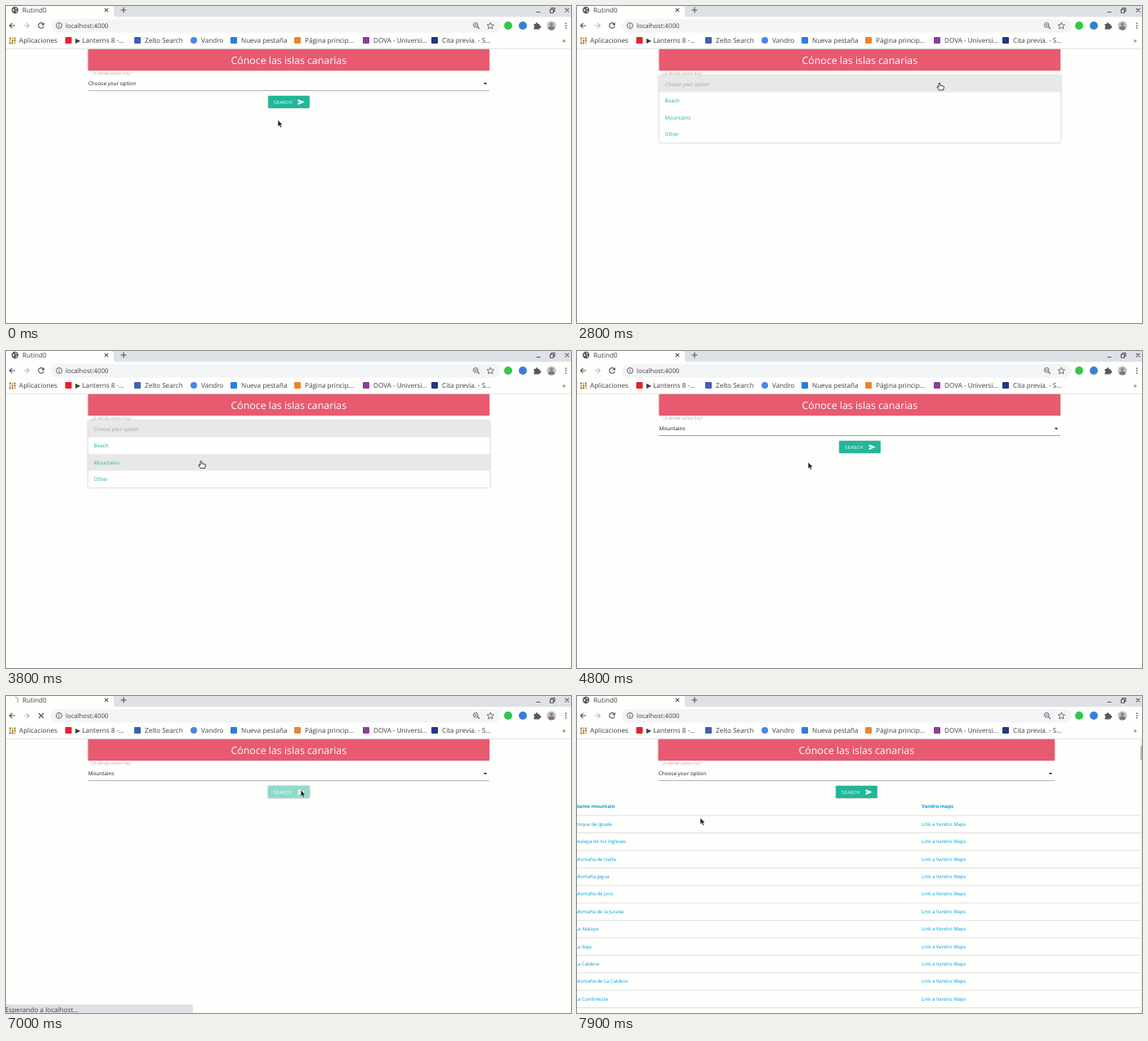
Animation of 692x388 px, one loop 8 s. Source, as an HTML page:

```html
<!DOCTYPE html>
<html lang="es">
<head>
<meta charset="utf-8">
<title>Rutind0</title>
<style>
  html, body { margin: 0; width: 100%; height: 100%; overflow: hidden; background: #fefefc; }
  svg { display: block; width: 692px; height: 388px; }
  text { font: 8.15px "Open Sans", "Noto Sans", sans-serif; fill: #3c4043; text-rendering: geometricPrecision; }
  .line { fill: none; stroke: #505357; stroke-width: 1.1; }
  .small { font-size: 6.35px; fill: #1c1c1c; }
  .label { font-size: 4.8px; fill: #a8a8a8; }
  .title { font-size: 12.35px; fill: #fff; text-anchor: middle; }
  .caps { font-size: 5.7px; letter-spacing: .25px; fill: #fff; }
  .option { font-size: 6.35px; fill: #22b296; }
  .off { fill: #a3a3a3; font-style: italic; }
  .link { font-size: 5.95px; fill: #0a9fdc; }
  .head { font-weight: 700; }
  .raised { filter: drop-shadow(0 .8px .8px rgba(0, 0, 0, .3)); }
</style>
</head>
<body>
<svg id="stage" viewBox="0 0 692 388">
  <rect width="692" height="388" fill="#fefefc"/>
  <g id="form"></g>
  <g id="results"></g>
  <g id="menu" class="raised"></g>

  <g id="browser">
    <rect width="692" height="13.5" fill="#dee1e6"/>
    <path d="M0 0H129Q132 0 132 3V10.500Q132 13.500 135 13.500H692V52H0Z" fill="#fefefc"/>
    <path d="M0 52.300H692" stroke="#dcdddf" stroke-width=".8"/>
    <rect x="55" y="16" width="551" height="16.500" rx="8.250" fill="#f3f4f5"/>
    <text x="20" y="8">Rutind0</text>
    <g id="globe">
      <circle cx="11" cy="5" r="4.200" fill="#55585c"/>
      <path d="M8 3.500l2.500 1 -.5 2 -1.500 -.5zM11 1.800l2.500 1.200 -1.500 1.500zM12 5.500l2 .5 -1.500 2z" fill="#e9eaec"/>
    </g>
    <path id="spinner" class="line" d="M11 1.200A3.900 3.900 0 0 1 13.700 7.900" style="stroke:#999da2"/>
    <path class="line" d="M120.800 2.800l4.400 4.400m0 -4.400l-4.400 4.400M140.500 5h7M144 1.500v7M649.500 7.500h5M684.800 2.800l4.600 4.600m0 -4.600l-4.600 4.600M666.500 4.200h4v4h-4zM668 4v-1.500h4v4h-1.500"/>
    <path class="line" d="M11.200 24H4.500m3 -3.200L4.300 24l3.200 3.200"/>
    <path class="line" d="M21.500 24h6.700m-3 -3.200l3.200 3.200 -3.200 3.200" style="stroke:#b7babd"/>
    <g id="reload">
      <path class="line" d="M45.500 21.700A3.300 3.300 0 1 0 46.200 24.800"/>
      <path d="M46.800 20v3.600h-3.600z" fill="#505357"/>
    </g>
    <path id="stop" class="line" d="M40 21l6 6m0 -6l-6 6"/>
    <circle class="line" cx="65" cy="24" r="3.500" style="stroke-width:.9"/>
    <path class="line" d="M65 23.500v2.500M65 21.800v.9" style="stroke-width:.9"/>
    <text x="73" y="26.800" style="font-size:7.75px">localhost:4000</text>
    <path class="line" d="M577.500 25.500l2.300 2.300M573.800 23.300h2.800"/>
    <circle class="line" cx="575.200" cy="23.300" r="2.800" style="stroke-width:.9"/>
    <path class="line" d="M593.300 20l1.200 2.800 3 .2 -2.300 2 .8 3 -2.700 -1.700 -2.700 1.700 .8 -3 -2.300 -2 3 -.2z" style="stroke-width:.8"/>
    <circle cx="615" cy="24" r="5" fill="#35c649"/>
    <circle cx="633" cy="24" r="5" fill="#3c7fd0"/>
    <path d="M646.500 22h2.300a1.300 1.300 0 1 1 2.400 0h2.300v2.300a1.300 1.300 0 1 1 0 2.400v1.800h-7v-1.900a1.300 1.300 0 0 0 0 -2.400z" fill="#55585c"/>
    <circle cx="668" cy="24" r="5.600" fill="#c9c0c2"/>
    <path d="M664 27.900a4 3.500 0 0 1 8 0a5.600 5.600 0 0 1 -8 0z" fill="#7c7780"/>
    <circle cx="668" cy="22.300" r="2.100" fill="#8f8584"/>
    <path d="M685.700 20.500v1.400m0 1.400v1.400m0 1.400v1.400" stroke="#505357" stroke-width="1.400"/>
    <text x="681.500" y="45">»</text>
  </g>

  <g id="status">
    <path d="M0 377.500H226.500Q229 377.500 229 380V388H0Z" fill="#dee1e6"/>
    <text x="-1" y="386.500">Esperando a localhost…</text>
  </g>
  <path id="arrow" d="M0 0V8.300L1.900 6.600 3.200 9.500 4.700 8.800 3.500 6H6Z" fill="#222" stroke="#fff" stroke-width=".6"/>
  <path id="hand" d="M-1 .8Q0 -.4 .9 .8V3.400L4.900 4.100Q5.700 4.400 5.500 5.500L4.600 8.900H-.6L-3 5.600Q-3.200 4.500 -2.100 4.700L-1 5.500Z" fill="#fff" stroke="#222" stroke-width=".9"/>
</svg>

<script>
const $ = id => document.getElementById(id);
const text = (x, y, str, cls = "") => `<text x="${x}" y="${y}" class="${cls}">${str}</text>`;
const rect = (x, y, w, h, fill, more = "") =>
  `<rect x="${x}" y="${y}" width="${w}" height="${h}" fill="${fill}" ${more}/>`;

// Bookmarks bar: icon x, colour, corner radius, label x, label
const bookmarks = [
  [72.5, "#e8212b", 1, 85, "▶ Lanterns 8 -…"],
  [157, "#3c62b4", 1, 170, "Zelto Search"],
  [226, "#4a86e8", 4, 239, "Vandro"],
  [275, "#2a7de1", 1, 288, "Nueva pestaña"],
  [353, "#e8862f", 1, 366, "Página princip…"],
  [437, "#8a3f98", 1, 450, "DOVA - Universi…"],
  [521, "#22387e", 1, 534, "Cita previa. - S…"]
];
let bar = text(16, 45, "Aplicaciones");
const dots = ["#e24a3b", "#f0b429", "#3f9d58"];
for (let i = 0; i < 9; i++)
  bar += rect(4 + i % 3 * 2.9, 38.6 + (i / 3 | 0) * 2.9, 2, 2, dots[(i + (i / 3 | 0)) % 3]);
for (const [ix, fill, r, x, label] of bookmarks)
  bar += rect(ix, 38, 8, 8, fill, `rx="${r}"`) + text(x, 45, label);
$("browser").insertAdjacentHTML("beforeend", bar);

// The search form; the scrollbar of the results page makes it narrower
function form(left, width, id) {
  const mid = left + width / 2, right = left + width, b = mid - 25.2;
  return rect(left, 52.6, width, 26.4, "#e75a70", 'class="raised"') +
    text(mid, 70.6, "Cónoce las islas canarias", "title") +
    text(left + 5, 84.2, "¿A dónde vamos hoy?", "label") +
    `<text id="value${id}" x="${left + .2}" y="97.200" class="small">Choose your option</text>
    <path d="M${right - 7.2} 93.900h4.400l-2.200 2.400z" fill="#222"/>
    <path id="rule${id}" d="M${left} 103.600H${right}" stroke="#9e9e9e" stroke-width=".8"/>
    <clipPath id="clip${id}">${rect(b, 110, 50.6, 15, "#000", 'rx="1"')}</clipPath>` +
    rect(b, 110, 50.6, 15, "#21b799", 'rx="1" class="raised"') +
    text(b + 7, 119.8, "SEARCH", "caps") +
    `<path d="M${b + 36.5} 114.200l8 3.400 -8 3.400v-2.700l5 -.7 -5 -.7z" fill="#fff"/>
    <g clip-path="url(#clip${id})"><circle id="ripple${id}" cx="361" cy="116" r="0" fill="#fff" opacity=".5"/></g>`;
}
$("form").innerHTML = form(100.6, 491.4, "A");

const peaks = ["Roque de Iguala", "Atalaya de los Ingleses", "Montaña de Izaña", "Montaña Jagua",
  "Montaña de Joco", "Montaña de la Jurada", "La Atalaya", "La Baja", "La Caldera",
  "Montaña de La Caldera", "La Cumbrecita"];
let table = form(99.6, 485.4, "B") +
  text(-2, 137.4, "Name mountain", "link head") + text(422, 137.4, "Vandro maps", "link head");
peaks.forEach((name, i) => {
  const y = 146.2 + i * 21.4;
  table += `<path d="M0 ${y}H690" stroke="#d3d3d3" stroke-width=".7"/>` +
    text(-2, y + 12.6, name, "link") + text(422, y + 12.6, "Link a Vandro Maps", "link");
});
table += '<path d="M0 381.600H690" stroke="#d3d3d3" stroke-width=".7"/>' +
  rect(690, 52.6, 2, 336, "#f1f1f1") + rect(690.3, 61, 1.7, 17, "#aeaeae");
$("results").innerHTML = table;

const options = ["Choose your option", "Beach", "Mountains", "Other"];
$("menu").innerHTML = rect(100.6, 85, 492, 82, "#fefefe") + options.map((name, i) =>
  rect(100.6, 85 + i * 20.5, 492, 20.5, "#e8e8e7", `id="row${i}"`) +
  text(107.6, 97.5 + i * 20.5, name, i ? "option" : "option off")).join("");

const LOOP = 8000, FRAME = 100;
const OPEN = 2384, PICK = 4200, CLICK = 5500, WAIT = 5700, LOADED = 7400;
// Pointer: time, x, y
const path = [
  [0, 333, 139.5], [200, 361, 177], [500, 311, 211], [800, 344, 145], [900, 345, 126],
  [1500, 421, 97], [2000, 444, 94], [3200, 444, 94], [3700, 239, 134.5], [4200, 239, 134.5],
  [4800, 283, 136], [5000, 283, 136], [5500, 361, 115], [7700, 361, 115], [7900, 151, 149]
];
const clamp = v => Math.min(1, Math.max(0, v));
const outQuint = v => 1 - (1 - clamp(v)) ** 5;
const show = (id, on) => $(id).setAttribute("visibility", on ? "visible" : "hidden");

function pointer(t) {
  const i = path.findIndex(p => p[0] > t);
  if (i < 0) return path[path.length - 1].slice(1);
  const [t0, x0, y0] = path[i - 1], [t1, x1, y1] = path[i];
  const u = (t - t0) / (t1 - t0), e = u * u * (3 - 2 * u);
  return [x0 + (x1 - x0) * e, y0 + (y1 - y0) * e];
}

function draw(t) {
  const [x, y] = pointer(t);
  const loading = t >= WAIT && t < LOADED, loaded = t >= LOADED;
  const open = t < PICK ? outQuint((t - OPEN) / 150) : 1 - outQuint((t - PICK) / 250);
  const overField = t < PICK && y > 85 && y < 104;
  const overMenu = t >= OPEN && t < PICK + 100;

  show("form", !loaded);
  show("results", loaded);
  for (const id of ["spinner", "stop", "status"]) show(id, loading);
  for (const id of ["globe", "reload"]) show(id, !loading);
  $("spinner").setAttribute("transform", `rotate(${-(t - 7000) * .36} 11 5)`);

  const scale = .3 + .7 * open;
  $("menu").setAttribute("transform", `translate(100.600 85) scale(${scale}) translate(-100.600 -85)`);
  $("menu").setAttribute("opacity", open);
  const hover = Math.floor((y - 85) / 20.5);
  for (let i = 1; i < 4; i++) $("row" + i).setAttribute("opacity", hover === i ? 1 : 0);

  $("valueA").textContent = options[t < PICK ? 0 : 2];
  $("ruleA").setAttribute("stroke", t >= OPEN && t < CLICK ? "#26b09a" : "#9e9e9e");
  $("rippleA").setAttribute("r", 52 * outQuint((t - CLICK) / 750));

  const hand = overField || overMenu;
  show("hand", hand);
  show("arrow", !hand);
  $(hand ? "hand" : "arrow").setAttribute("transform", `translate(${x} ${y})`);
}

const start = performance.now();
function tick() {
  const t = (performance.now() - start) % LOOP;
  draw(Math.floor(t / FRAME) * FRAME);
  requestAnimationFrame(tick);
}
tick();
</script>
</body>
</html>
```
